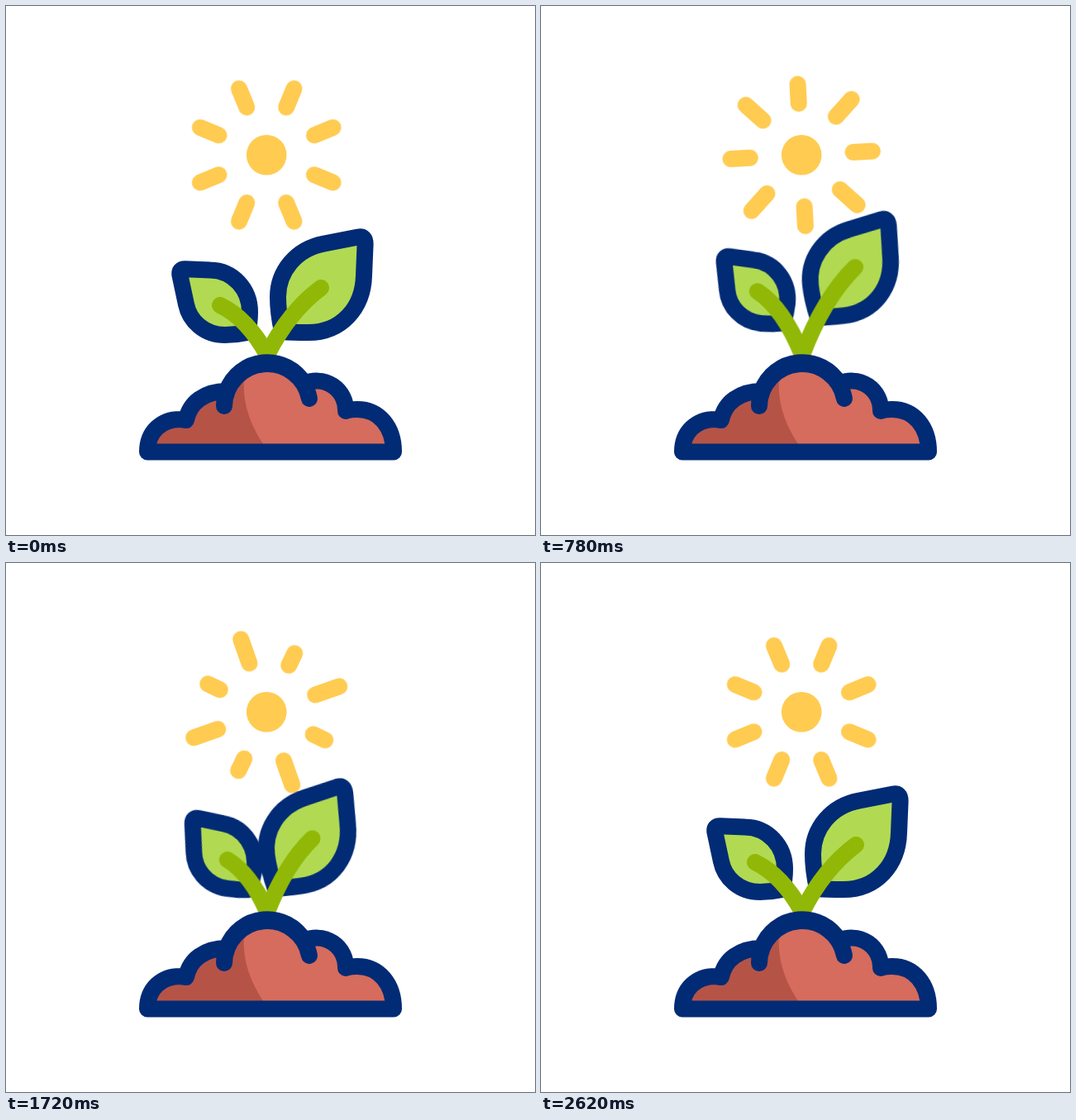
Write an HTML page without scripts that moves like this. It is 640 px wide and 640 px high and loops after 3000 ms.

```html
<!DOCTYPE html>
<html lang="en">
<head>
<meta charset="utf-8">
<title>Sprout in the sun</title>
<style>
html, body { margin: 0; width: 100%; height: 100%; overflow: hidden; background: #fff; }
svg { display: block; width: 100%; height: 100%; }
path, use { stroke-linecap: round; stroke-linejoin: round; }

.sun, .ray, .leaf, .stem {
  animation: 3s cubic-bezier(.333, 0, .667, 1) infinite;
}
.ray, .leaf, .stem { stroke-width: 20; vector-effect: non-scaling-stroke; }

.sun { animation-name: spin; }
.ray { stroke: #ffcb51; transform-origin: 0 -62.5px; }
.a { animation-name: ray-a; }
.b { animation-name: ray-b; }

/* Leaves scale across and along their own axis, hence the paired rotations. */
.leaf { fill: #b1da52; stroke: #022b75; }
.leaf.left { transform-origin: 259px 362px; animation-name: leaf-left; }
.leaf.right { transform-origin: 381px 341px; animation-name: leaf-right; }
.stem { fill: none; stroke: #91b807; transform-origin: 316px 422px; }
.stem.left { animation-name: stem-left; }
.stem.right { animation-name: stem-right; }

@keyframes spin {
  0%, 6.93% { transform: rotate(0deg); }
  87.07%, 100% { transform: rotate(135deg); }
}
@keyframes ray-a {
  0%, 6.93%, 86.93%, 100% { transform: scaleY(1); }
  20.27%, 46.93%, 73.6% { transform: scaleY(.7); }
  33.6%, 60.27% { transform: scaleY(1.34); }
}
@keyframes ray-b {
  0%, 6.93%, 86.93%, 100% { transform: scaleY(1); }
  20.27%, 46.93%, 73.6% { transform: scaleY(1.55); }
  33.6%, 60.27% { transform: scaleY(.54); }
}
@keyframes leaf-right {
  0%, 6.93%, 40.27%, 80.27%, 100% { transform: translate(0px, 0px) rotate(41deg) scale(1, 1) rotate(-41deg); }
  16.6% { transform: translate(29px, 24px) rotate(72deg) scale(1.05, .94) rotate(-41deg); }
  26.27% { transform: translate(-6.5px, -19.5px) rotate(35deg) scale(.96, .96) rotate(-41deg); }
  35.27% { transform: translate(8px, 5px) rotate(47deg) scale(1, 1) rotate(-41deg); }
  49.93% { transform: translate(32px, 16px) rotate(78deg) scale(1.06, .92) rotate(-41deg); }
  57.93% { transform: translate(-17px, -5px) rotate(33deg) scale(.98, .98) rotate(-41deg); }
  68.27% { transform: translate(12.4px, 6.5px) rotate(49deg) scale(1, 1) rotate(-41deg); }
}
@keyframes leaf-left {
  0%, 6.93%, 40.27%, 80.27%, 100% { transform: translate(0px, 0px) rotate(-48deg) scale(1, 1) rotate(48deg); }
  16.6% { transform: translate(-13px, 13px) rotate(-75deg) scale(1, .94) rotate(48deg); }
  26.27% { transform: translate(5.4px, -13px) rotate(-42deg) scale(.96, .96) rotate(48deg); }
  35.27% { transform: translate(-5px, 5px) rotate(-57deg) scale(.99, .99) rotate(48deg); }
  49.93% { transform: translate(-4px, -3px) rotate(-76deg) scale(.97, .92) rotate(48deg); }
  57.93% { transform: translate(8px, -4px) rotate(-38deg) scale(.98, .98) rotate(48deg); }
  68.27% { transform: translate(-8px, 8px) rotate(-62deg) scale(.98, .98) rotate(48deg); }
}
@keyframes stem-right {
  0%, 6.93%, 40.27%, 80.27%, 100% { transform: scale(1, 1); }
  16.6% { transform: scale(1.45, .73); }
  26.27% { transform: scale(.985, 1.31); }
  35.27% { transform: scale(1.12, .94); }
  49.93% { transform: scale(1.5, .81); }
  57.93% { transform: scale(.83, 1.1); }
  68.27% { transform: scale(1.18, .91); }
}
@keyframes stem-left {
  0%, 6.93%, 40.27%, 80.27%, 100% { transform: scale(1, 1); }
  16.6% { transform: scale(1.23, .76); }
  26.27% { transform: scale(.95, 1.28); }
  35.27% { transform: scale(1.11, .92); }
  49.93% { transform: scale(1.19, 1); }
  57.93% { transform: scale(.84, 1.05); }
  68.27% { transform: scale(1.175, .87); }
}
</style>
</head>
<body>
<svg viewBox="0 0 640 640">
  <defs>
    <path id="mound" d="M171 539.5C171 515 188 500 211 500L218 501C222 480 240 466 267 466A52 52 0 0 1 361 457A35 35 0 0 1 411 490C416 488 420 488 425 488C451 488 469 509 469 539.5Z"/>
  </defs>

  <g transform="translate(315.2 180.3)">
    <circle r="24.3" fill="#ffcb51"/>
    <g class="sun">
      <g transform="rotate(-22.5)"><path class="ray a" d="M0-62.5V-87"/></g>
      <g transform="rotate(22.5)"><path class="ray b" d="M0-62.5V-87"/></g>
      <g transform="rotate(67.5)"><path class="ray a" d="M0-62.5V-87"/></g>
      <g transform="rotate(112.5)"><path class="ray b" d="M0-62.5V-87"/></g>
      <g transform="rotate(157.5)"><path class="ray a" d="M0-62.5V-87"/></g>
      <g transform="rotate(202.5)"><path class="ray b" d="M0-62.5V-87"/></g>
      <g transform="rotate(247.5)"><path class="ray a" d="M0-62.5V-87"/></g>
      <g transform="rotate(292.5)"><path class="ray b" d="M0-62.5V-87"/></g>
    </g>
  </g>

  <path class="leaf left" d="M217 318.3L247 319.5C275 320 295 343 295 370C295 380 294 387 292 395C283 397 274 398 265 398C240 398 222 381 218 361L210.5 326Q209 318 217 318.3Z"/>
  <path class="leaf right" d="M426 279.5L385 287.5C350 294 329 322 329 352C329 366 331 380 334 394C345 395 355 395 366 395C405 395 432 366 433 326L434.6 288Q434.8 278 426 279.5Z"/>
  <path class="stem left" d="M259 362Q292 378 316 422"/>
  <path class="stem right" d="M381 341Q342 370 316 422"/>

  <use href="#mound" fill="#d56c5d"/>
  <path fill="#b65347" d="M171 539.5C171 515 188 500 211 500L218 501C222 480 240 466 267 466Q274 449 289 440C284 475 293 506 318 539.5Z"/>
  <g fill="none" stroke="#022b75" stroke-width="20">
    <use href="#mound"/>
    <path d="M264 484A52 52 0 0 1 367 475"/>
  </g>
</svg>
</body>
</html>
```
